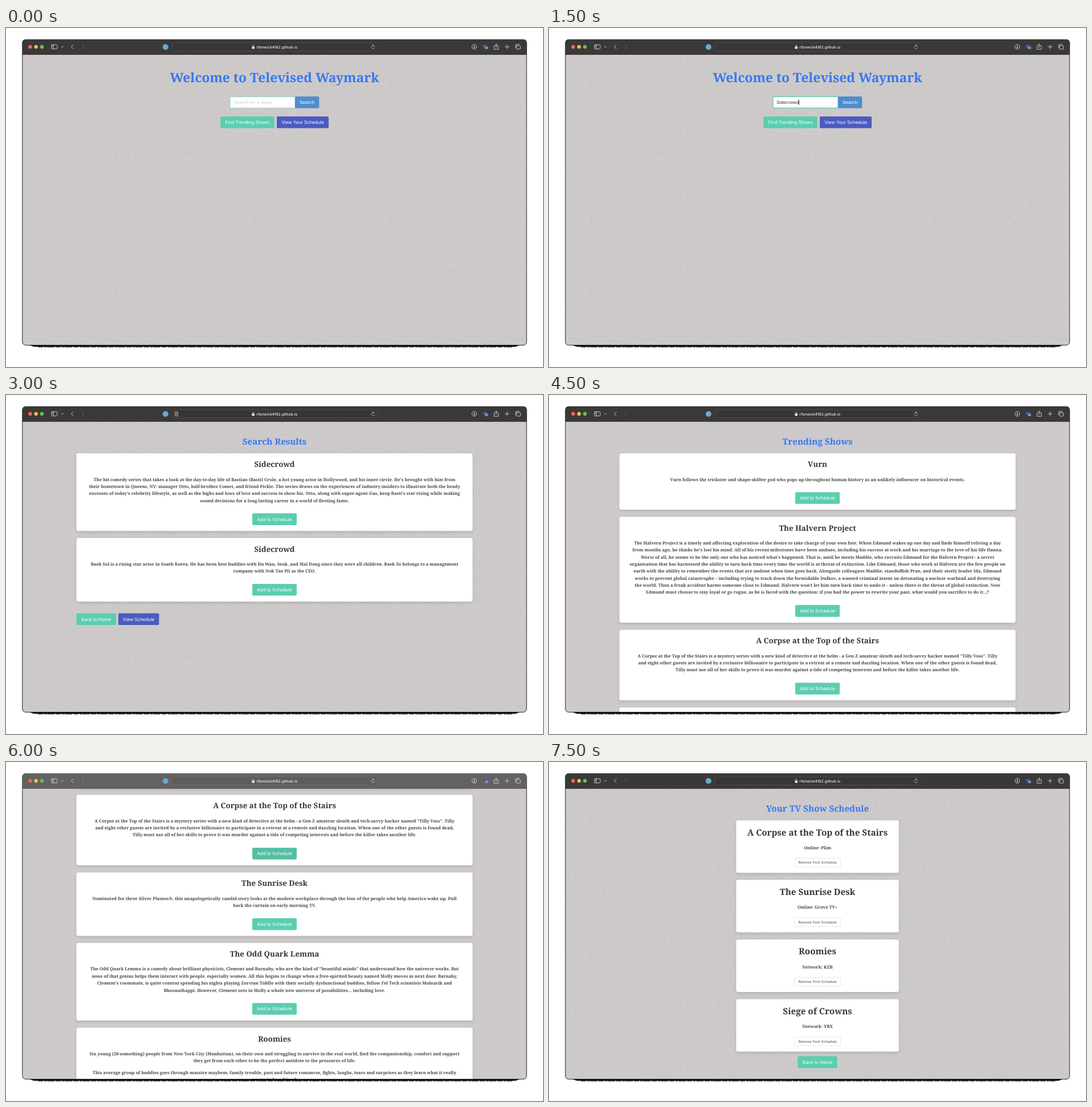
Animation of 942x594 px, one loop 8000 ms. Source, as an HTML page:

```html
<!DOCTYPE html>
<html lang="en">
<head>
<meta charset="utf-8">
<title>TV show finder</title>
<style>
  html, body { margin: 0; width: 100%; height: 100%; overflow: hidden; background: #fff; }
  svg { display: block; }
  text { text-rendering: geometricPrecision; font-family: Inter, "Open Sans", sans-serif; }
  .serif { font-family: "Noto Serif", "Liberation Serif", serif; font-weight: 700; }
  .card { fill: #fff; filter: drop-shadow(0 2px 2.5px rgba(10, 10, 10, .14)); }
  .icon { fill: none; stroke: #c9c7c6; stroke-width: 1; stroke-linecap: round; stroke-linejoin: round; }
</style>
</head>
<body>
<svg id="stage" width="942" height="594" viewBox="0 0 942 594"></svg>
<script>
const LOOP = 8000, STEP = 1500, CENTER = 471;
const TEAL = '#5ccdb0', TEAL_HOVER = '#55bea4', INDIGO = '#4a5cc0', BLUE = '#4f8dd0', TITLE = '#3478f3';
const REM = 7.6, LINE = 12.37, SCROLL = 354;

const rect = (x, y, w, h, fill, r = 0, extra = '') =>
  `<rect x="${x}" y="${y}" width="${w}" height="${h}" rx="${r}" fill="${fill}" ${extra}/>`;
const text = (x, y, str, size, fill, extra = '') =>
  `<text x="${x}" y="${y}" font-size="${size}" fill="${fill}" ${extra}>${str}</text>`;
const serif = (y, str, rems, fill) =>
  text(CENTER, y, str, REM * rems, fill, 'class="serif" text-anchor="middle"');
const button = (x, y, w, label, fill = TEAL, id = '') =>
  rect(x, y, w, 20.6, fill, 2, id && `id="${id}"`) +
  text(x + w / 2, y + 13.2, label, 7.9, '#fff', 'text-anchor="middle"');
const icon = (d, extra = '') => `<path class="icon" d="${d}" ${extra}/>`;

// One show with a description; a blank line starts a new paragraph.
function showCard(top, [name, ...lines], id) {
  let y = top + 48.3 - LINE;
  const body = lines.map(line => {
    y += line ? LINE : 8.3;
    return serif(y, line, 1, '#454545');
  }).join('');
  const height = y + 50.6 - top;
  return {
    bottom: top + height,
    svg: `<rect class="card" x="123.5" y="${top}" width="695" height="${height}" rx="3.5"/>` +
      serif(top + 24, name, 1.75, '#363636') + body +
      button(432, y + 19.7, 78, 'Add to Schedule', TEAL, id)
  };
}

function showList(shows, hoverIndex) {
  let top = 102.2;
  return shows.map((show, i) => {
    const card = showCard(top, show, i === hoverIndex ? 'hoverButton' : '');
    top = card.bottom + 12.4;
    return card.svg;
  }).join('');
}

function scheduleCard([name, channel], i) {
  const top = 102.2 + i * 104.4;
  return `<rect class="card" x="328.3" y="${top}" width="285.4" height="92" rx="3.5"/>` +
    serif(top + 26.3, name, 2, '#363636') +
    serif(top + 50.8, channel, 1, '#454545') +
    rect(431, top + 66.4, 80.4, 15.2, '#fff', 1.5, 'stroke="#dbdbdb" stroke-width=".7"') +
    text(CENTER, top + 76.2, 'Remove from Schedule', 6.1, '#454545', 'text-anchor="middle"');
}

// Seeded short squiggles, used as a tiled paper texture.
function squiggles() {
  let seed = 7;
  const random = () => (seed = seed * 16807 % 2147483647) / 2147483647;
  let d = '';
  for (let i = 0; i < 620; i++) {
    const angle = random() * 6.283, bend = (random() - .5) * 3;
    const dx = 3.4 * Math.cos(angle), dy = 3.4 * Math.sin(angle);
    d += `M${(random() * 120).toFixed(1)} ${(random() * 120).toFixed(1)}q` +
      [dx / 2 - dy * bend / 3, dy / 2 + dx * bend / 3].map(v => v.toFixed(1)) +
      ` ${dx.toFixed(1)} ${dy.toFixed(1)}`;
  }
  return `<path d="${d}" fill="none" stroke="#b9bcbf" stroke-width=".7" opacity=".62"/>`;
}

const results = [
  ['Sidecrowd',
    "The hit comedy series that takes a look at the day-to-day life of Bastian (Basti) Crole, a hot young actor in Hollywood, and his inner circle. He's brought with him from",
    'their hometown in Queens, NY: manager Otto, half-brother Comet, and friend Pickle. The series draws on the experiences of industry insiders to illustrate both the heady',
    "excesses of today's celebrity lifestyle, as well as the highs and lows of love and success in show biz. Otto, along with super-agent Gus, keep Basti's star rising while making",
    'sound decisions for a long-lasting career in a world of fleeting fame.'],
  ['Sidecrowd',
    'Baek Sol is a rising star actor in South Korea. He has been best buddies with Du Wan, Seok, and Mal Dong since they were all children. Baek So belongs to a management',
    'company with Noh Tae Pil as the CEO.']
];

const trending = [
  ['Vurn',
    'Vurn follows the trickster and shape-shifter god who pops up throughout human history as an unlikely influencer on historical events.'],
  ['The Halvern Project',
    'The Halvern Project is a timely and affecting exploration of the desire to take charge of your own fate. When Edmund wakes up one day and finds himself reliving a day',
    "from months ago, he thinks he's lost his mind. All of his recent milestones have been undone, including his success at work and his marriage to the love of his life Hanna.",
    "Worst of all, he seems to be the only one who has noticed what's happened. That is, until he meets Maddie, who recruits Edmund for the Halvern Project - a secret",
    'organisation that has harnessed the ability to turn back time every time the world is at threat of extinction. Like Edmund, those who work at Halvern are the few people on',
    'earth with the ability to remember the events that are undone when time goes back. Alongside colleagues Maddie, standoffish Prue, and their steely leader Ida, Edmund',
    'works to prevent global catastrophe – including trying to track down the formidable Dulkov, a wanted criminal intent on detonating a nuclear warhead and destroying',
    "the world. Then a freak accident harms someone close to Edmund. Halvern won't let him turn back time to undo it – unless there is the threat of global extinction. Now",
    'Edmund must choose to stay loyal or go rogue, as he is faced with the question: if you had the power to rewrite your past, what would you sacrifice to do it…?'],
  ['A Corpse at the Top of the Stairs',
    'A Corpse at the Top of the Stairs is a mystery series with a new kind of detective at the helm - a Gen Z amateur sleuth and tech-savvy hacker named "Tilly Voss". Tilly',
    'and eight other guests are invited by a reclusive billionaire to participate in a retreat at a remote and dazzling location. When one of the other guests is found dead,',
    'Tilly must use all of her skills to prove it was murder against a tide of competing interests and before the killer takes another life.'],
  ['The Sunrise Desk',
    'Nominated for three Silver Plumes®, this unapologetically candid story looks at the modern workplace through the lens of the people who help America wake up. Pull',
    'back the curtain on early morning TV.'],
  ['The Odd Quark Lemma',
    'The Odd Quark Lemma is a comedy about brilliant physicists, Clement and Barnaby, who are the kind of "beautiful minds" that understand how the universe works. But',
    'none of that genius helps them interact with people, especially women. All this begins to change when a free-spirited beauty named Molly moves in next door. Barnaby,',
    "Clement's roommate, is quite content spending his nights playing Zorvian Tiddle with their socially dysfunctional buddies, fellow Fel Tech scientists Molnarik and",
    'Bhoonathappi. However, Clement sees in Molly a whole new universe of possibilities... including love.'],
  ['Roomies',
    'Six young (20-something) people from New York City (Manhattan), on their own and struggling to survive in the real world, find the companionship, comfort and support',
    'they get from each other to be the perfect antidote to the pressures of life.',
    '',
    'This average group of buddies goes through massive mayhem, family trouble, past and future romances, fights, laughs, tears and surprises as they learn what it really',
    'means to be a friend.']
];

const schedule = [
  ['A Corpse at the Top of the Stairs', 'Online: Plim'],
  ['The Sunrise Desk', 'Online: Grove TV+'],
  ['Roomies', 'Network: KZB'],
  ['Siege of Crowns', 'Network: YBX']
];

const pages = {
  home: serif(95, 'Welcome to Televised Waymark', 3, TITLE) +
    rect(393, 120.4, 114, 19.8, '#fff', 1.5, `id="field" stroke="${TEAL}"`) +
    text(399, 133.2, 'Search for a show', 7.9, '#cfcfcf', 'id="placeholder"') +
    `<g id="typed">${text(399, 133.2, 'Sidecrowd', 7.9, '#363636')}${rect(438.2, 125.4, .8, 9.6, '#222')}</g>` +
    button(507, 120, 42.3, 'Search', BLUE) +
    button(376.2, 155, 94.5, 'Find Trending Shows') +
    button(475, 155, 91, 'View Your Schedule', INDIGO),
  results: serif(87, 'Search Results', 2, TITLE) + showList(results) +
    button(123.5, 382.4, 69.4, 'Back to Home') +
    button(197, 382.4, 71.5, 'View Schedule', INDIGO),
  trending: serif(87, 'Trending Shows', 2, TITLE) + showList(trending, 2),
  schedule: serif(87, 'Your TV Show Schedule', 2, TITLE) + schedule.map(scheduleCard).join('') +
    button(436.2, 515.6, 69.4, 'Back to Home')
};

const toolbar =
  `<path id="bar" d="M28.5 47V26q0-6 6-6H907.500q6 0 6 6V47Z"/>` +
  ['#ee6a5f', '#f5bd4f', '#61c554'].map((c, i) => `<circle cx="${42.4 + i * 10.3}" cy="33" r="3.2" fill="${c}"/>`).join('') +
  icon('M81 29.300h7.500q1.300 0 1.300 1.300v4.800q0 1.300-1.300 1.300h-7.500q-1.300 0-1.300-1.300v-4.800q0-1.300 1.300-1.300ZM83.200 29.300v7.400M81 31.300h.8M81 33h.8', 'stroke-width=".8"') +
  icon('M97.200 32.300l1.700 1.700 1.700-1.700M118 29.500l-3.500 3.500 3.500 3.500') +
  icon('M133.300 29.500l3.500 3.500-3.500 3.500', 'opacity=".3"') +
  '<circle cx="279.800" cy="33.200" r="5" fill="#69a9d2"/>' +
  rect(291.5, 26.3, 359.500, 13.700, '#000', 3.500, 'fill-opacity=".06" stroke="#8a8887" stroke-opacity=".3" stroke-width=".7"') +
  `<g id="reader">${icon('M296.700 29.500h4.600v7.200h-4.600ZM297.900 31.500h2.200M297.900 33.200h2.200M297.900 34.900h1.300', 'style="stroke-width:.8"')}</g>` +
  rect(431.3, 32.6, 4.8, 4, '#e6e5e4', .8) +
  icon('M432.300 32.600v-1.200q0-1.600 1.400-1.600t1.400 1.600v1.200', 'style="stroke-width:.8"') +
  text(439.3, 35.8, 'rfenwick4182.github.io', 6.6, '#f1f0ef', 'font-weight="500"') +
  icon('M646.600 32a3 3 0 1 0 .3 2.300M643.500 29.200l1.800 1.100-1.300 1.600', 'style="stroke-width:.8"') +
  '<circle class="icon" cx="821.500" cy="33" r="4.200"/>' + icon('M821.500 30.700v4.400M819.800 33.500l1.700 1.700 1.700-1.700') +
  rect(836.5, 29.4, 7, 5.200, '#3d5f91', 1) + rect(840, 32.5, 5.600, 4.500, '#6d93c8', 1) +
  icon('M858 31.500h-1.800v5.800h7.600v-5.800h-1.800M860 34.200v-6M858.100 30l1.900-1.900 1.900 1.900') +
  icon('M875.500 33h7M879 29.500v7') +
  icon('M896.400 31h5q1 0 1 1v4q0 1-1 1h-5q-1 0-1-1v-4q0-1 1-1ZM894 34.900v-5q0-1.200 1.200-1.200h5.300');

const stage = document.getElementById('stage');
stage.innerHTML =
  `<defs>
    <pattern id="paper" width="120" height="120" patternUnits="userSpaceOnUse">${squiggles()}</pattern>
    <clipPath id="window">${rect(28.5, 20, 885, 536, '#000', 6)}</clipPath>
  </defs>` +
  '<path d="M40 555.500h862l-8 3H49Z"/>' +
  '<path d="M56 559H888" stroke="#000" stroke-width="1" stroke-dasharray="9 2 4 1 13 2"/>' +
  '<g clip-path="url(#window)">' + rect(28, 20, 886, 537, '#cecaca') +
  rect(28, 20, 886, 537, 'url(#paper)', 0, 'id="texture"') +
  Object.entries(pages).map(([name, svg]) => `<g id="${name}">${svg}</g>`).join('') + '</g>' +
  rect(28.8, 20.3, 884.4, 535.5, 'none', 6, 'stroke="#111" stroke-width=".9"') + toolbar;

const el = id => document.getElementById(id);
const show = (id, visible) => el(id).style.display = visible ? '' : 'none';
const sequence = ['home', 'home', 'results', 'trending', 'trending', 'schedule'];

function draw() {
  const step = Math.floor(performance.now() % LOOP / STEP);
  const page = sequence[step], typed = step === 1, scrolled = step === 4;
  for (const name in pages) show(name, name === page);
  show('texture', page !== 'trending');
  show('placeholder', !typed);
  show('typed', typed);
  show('reader', page === 'results');
  el('field').setAttribute('stroke-width', typed ? 1.2 : .7);
  el('trending').setAttribute('transform', `translate(0 ${scrolled ? -SCROLL : 0})`);
  el('hoverButton').setAttribute('fill', scrolled ? TEAL_HOVER : TEAL);
  el('bar').setAttribute('fill', scrolled ? '#646261' : '#3b3938');
  requestAnimationFrame(draw);
}
draw();
</script>
</body>
</html>
```
